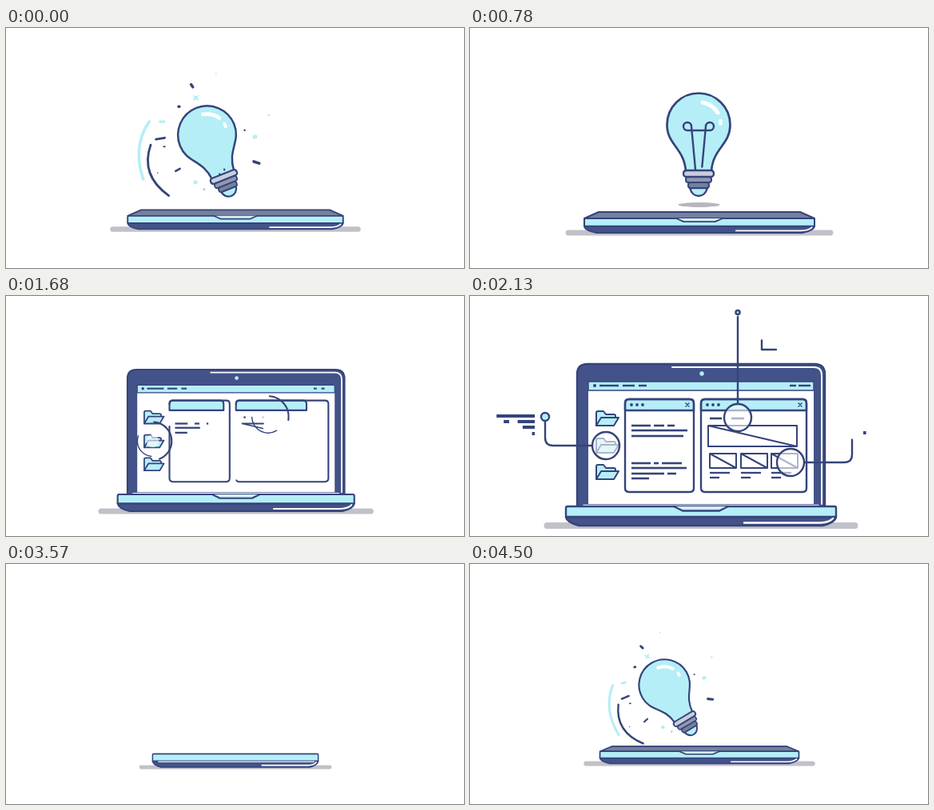
An HTML page with a canvas that plays this animation: 573x300 px, repeating every 4530 ms.

```html
<!DOCTYPE html>
<html lang="en">
<head>
<meta charset="utf-8">
<title>Idea to product</title>
<style>
html, body { margin: 0; width: 100%; height: 100%; overflow: hidden; background: #fff }
canvas { display: block }
</style>
</head>
<body>
<canvas id="stage" width="573" height="300"></canvas>
<script>
const ctx = document.getElementById('stage').getContext('2d');
const LOOP = 4530, LEAD = 230;
const INK = '#35447a', NAVY = '#435389', LIGHT = '#b5eef7', GREY = '#75809d', SHADE = '#c1c1c9', WHITE = '#fff';
let T = 0;

const smooth = u => (u = Math.min(1, Math.max(0, u)), u * u * (3 - 2 * u));
const ramp = (start, length) => smooth((T - start) / length);
const show = (start, length, gone, out = 130) => ramp(start, length) * (1 - ramp(gone, out));

// Eased value through time/value pairs
function key(...k) {
  for (let i = 2; i < k.length; i += 2)
    if (T < k[i]) return k[i - 1] + (k[i + 1] - k[i - 1]) * smooth((T - k[i - 2]) / (k[i] - k[i - 2]));
  return k[k.length - 1];
}

function draw(d, fill, stroke = INK, w = 2.4, p = 1, length = 1) {
  if (p <= 0) return;
  const path = new Path2D(d);
  if (fill) { ctx.fillStyle = fill; ctx.fill(path); }
  if (!stroke) return;
  ctx.strokeStyle = stroke;
  ctx.lineWidth = w;
  ctx.setLineDash(p < 1 ? [length * p, length * 2] : []);
  ctx.stroke(path);
  ctx.setLineDash([]);
}

const box = (x, y, w, h, r) =>
  `M${x} ${y + r}q0 ${-r} ${r} ${-r}h${w - 2 * r}q${r} 0 ${r} ${r}v${h - 2 * r}q0 ${r} ${-r} ${r}h${2 * r - w}q${-r} 0 ${-r} ${-r}z`;

function disc(x, y, r, fill, stroke, w = 2.4) {
  if (r <= 0) return;
  ctx.beginPath();
  ctx.arc(x, y, r, 0, 7);
  if (fill) { ctx.fillStyle = fill; ctx.fill(); }
  if (stroke) { ctx.strokeStyle = stroke; ctx.lineWidth = w; ctx.stroke(); }
}

function group(fn) { ctx.save(); fn(); ctx.restore(); }

// Rows are [y, from, to, from, to, ...]; every bar grows on its own
function bars(rows, start, gone, w = 2.6, fromRight = false) {
  ctx.fillStyle = INK;
  rows.forEach(([y, ...x], i) => {
    for (let j = 0; j < x.length; j += 2) {
      const width = (x[j + 1] - x[j]) * show(start + i * 25 + j * 12, 150, gone);
      ctx.fillRect(fromRight ? x[j + 1] - width : x[j], y - w / 2, width, w);
    }
  });
}

// x, y, length, angle, width, colour
const SPARKS = [
  [-51, -136, 4, 55, 3.4, INK], [-67, -110, 1, 0, 3.4, INK], [-88, -91, 5, 0, 3.4, LIGHT],
  [-90, -70, 11, -10, 2.8, INK], [-85, -60, 1, 0, 2.2, INK], [-68, -31, 6, -30, 2.6, INK],
  [-93, -27, 0, 0, 1.5, INK], [-46, -16, 1, 0, 4.5, LIGHT], [-35, -7, 0, 0, 2.8, SHADE],
  [28, -73, 1, 0, 5, LIGHT], [15, -81, 0, 0, 2.4, INK], [30, -41, 7, 18, 3.6, INK],
  [45, -100, 0, 0, 3, LIGHT], [-21, -151, 0, 0, 1.5, SHADE]
];

function sparks() {
  const size = key(-110, 0, -50, 1, 120, 1, 450, 0);
  if (T < -95 || size <= 0) return;
  group(() => {
    ctx.translate(283, 209);
    ctx.rotate(25 * (1 - Math.exp(-T / 72)) * Math.PI / 180);
    const k = 1.25 - .25 * Math.exp(-T / 66);
    ctx.scale(k, k);
    const arc = 1 - ramp(0, 260);
    draw('M-111-19Q-125-60-104-91', null, LIGHT, 3.6, arc, 78);
    draw('M-79 1Q-115-24-102-62', null, INK, 2.8, arc, 76);
    for (const [x, y, length, angle, w, colour] of SPARKS) group(() => {
      ctx.translate(x, y);
      ctx.rotate(angle * Math.PI / 180);
      ctx.scale(size, size);
      draw(`M${-length / 2} 0h${length + .01}`, null, colour, w);
    });
    group(() => {
      ctx.translate(-46, -121);
      ctx.scale(size, size);
      draw('M-4-4L0-2 4-4 2 0 4 4 0 2-4 4-2 0z', LIGHT, null);
    });
  });
}

function bulb() {
  if (T < -85 || T > 1050) return;
  const fall = 1 - .75 * ramp(900, 150);
  const size = Math.max(.1, 1 - .08 * Math.exp(-T / 33)) * fall;
  group(() => {
    ctx.translate(key(-30, 280, 0, 282, 250, 286), key(-85, 236, -30, 213, 0, 210, 250, 209, 780, 210, 890, 207, 1050, 244));
    ctx.rotate(-22 * Math.exp(-T / 87) * Math.PI / 180);
    ctx.scale(size, size);
    draw('M-16-31C-18-60-39.5-64-39.5-89A39.5 39.5 0 0 1 39.5-89C39.5-64 18-60 16-31z', LIGHT, INK, 2.7);
    const p = ramp(-20, 380) / 2;
    if (p > 0) {
      ctx.strokeStyle = INK;
      ctx.lineWidth = 2.4;
      ctx.setLineDash([179 * p, 179 * (1 - 2 * p), 179 * p, 400]);
      ctx.stroke(new Path2D('M-4-33L-9-87A5 5 0 1 0-14-82H14A5 5 0 1 0 9-87L4-33'));
      ctx.setLineDash([]);
    }
    draw('M5-117Q18-114 24-104', null, WHITE, 5);
    draw('M27.5-94v3.5', null, WHITE, 4.6);
    draw('M-11-10Q-8 0 0 0T11-10z', LIGHT);
    draw(box(-13, -17, 26, 7, 3), GREY, INK, 2);
    draw(box(-16, -24, 32, 7, 3), '#8f98b1', INK, 2);
    draw(box(-19, -32, 38, 8, 4), '#c9cede', INK, 2.3);
  });
}

function folder(y, p) {
  if (p <= 0) return;
  group(() => {
    ctx.translate(171, y + 9);
    ctx.scale(p, p);
    draw('M-13 9V-7q0-2 2-2h7l3 4H9q2 0 2 2v3', LIGHT, INK, 2);
    draw('M-13 9L-7-1H15L9 9z', LIGHT, INK, 2);
  });
}

function browser(x, width, start) {
  const p = show(start, 250, 2960), y = 129;
  if (p <= 0) return;
  draw(`M${x} ${y + 14}v-9q0-5 5-5h${width * p - 10}q5 0 5 5v9z`, LIGHT);
  draw(box(x, y, width, 116, 5), null, INK, 2.4, p, 2 * width + 232);
  const dot = show(start + 200, 150, 2940);
  for (const dx of [8, 15, 22]) disc(x + dx, 136, 1.9 * dot, INK);
  if (dot > .5) draw(`M${x + width - 10} 134l4 4m0-4l-4 4`, null, INK, 1.5);
}

function screen() {
  draw('M148 107H430V260H148z', WHITE, null);
  draw('M148 107H430V118H148z', LIGHT, INK, 1.4);
  draw('M142 261.5H436', null, WHITE, 1.5);
  disc(156, 112, 2 * show(1420, 120, 3000), INK);
  bars([[112, 162, 186, 191, 206, 211, 221, 400, 408, 411, 426]], 1530, 2980, 2.4);
  [144, 178, 211].forEach((y, i) => folder(y, show(1380 + i * 50, 150, 2970)));
  browser(194, 86, 1480);
  browser(289, 132, 1510);
  bars([[162, 202, 226, 230, 243, 247, 256], [168, 202, 272], [175, 202, 267]], 1580, 2920);
  bars([[209, 202, 226, 230, 236, 240, 265], [215, 202, 271], [222, 202, 243, 247, 258], [228, 202, 224]], 1680, 2920);
  bars([[153, 300, 315, 327, 343]], 1640, 2920);
  const banner = show(1640, 240, 2920);
  draw('M298 162H409V188H298zL409 188', null, INK, 2, banner, 388);
  [300, 339, 377].forEach((x, i) => {
    draw(`M${x} 197h33v18h-33zl33 18`, null, INK, 2, show(1700 + i * 90, 220, 2920), 140);
    bars([[221, x, x + 25], [227, x, x + 12]], 1760 + i * 70, 2920, 2.3);
  });
}

function lid(open) {
  if (open <= 0) return;
  group(() => {
    ctx.translate(0, 263);
    ctx.scale(1, open);
    ctx.translate(0, -263);
    draw('M134 264V98Q134 85 147 85H431Q444 85 444 98V264z', NAVY);
    draw('M253 89H430Q440 89 440 99V260', null, WHITE, 2);
    disc(290, 97, 2.7, LIGHT);
    screen();
  });
}

function base(h, face) {
  if (face > 0) {
    const y = 287 - 24 * h;
    draw(`M120 ${y}L141 ${y - face}H437L458 ${y}z`, GREY);
  }
  group(() => {
    ctx.translate(0, 287);
    ctx.scale(1, h);
    ctx.translate(0, -287);
    draw('M120 276H458Q457 283 441 287H137Q121 283 120 276z', NAVY);
    draw('M120 276V265Q120 263 122 263H456Q458 263 458 265V276z', LIGHT);
    if (T > 3240 || T < -120) draw('M132 277H450', null, WHITE, 1.6);
    else draw('M255 263L266 268.5H312L323 263', '#d5edf3');
    draw('M343 283.5H438Q450 283 454 278', null, WHITE, 2.4);
  });
}

function lens(x, y, start) {
  const p = show(start, 210, 2900);
  if (p <= 0) return;
  const r = 17 * (1.9 - .9 * p), turn = 2 * Math.PI * Math.min(1, p * 1.3);
  disc(x, y, r * p, 'rgba(255,255,255,.6)');
  ctx.strokeStyle = INK;
  ctx.lineWidth = 2.4;
  ctx.beginPath();
  ctx.arc(x, y, r, -1.5, -1.5 + turn);
  ctx.stroke();
  if (p < 1) {
    ctx.lineWidth = 1.6;
    ctx.beginPath();
    ctx.arc(x, y, r * .8, p * 5, p * 5 + 2 * (1 - p) + .5);
    ctx.stroke();
  }
}

function callout(x, y, path, length, endX, endY, start, lineStart, ringStart) {
  lens(x, y, start);
  draw(path, null, INK, 2.4, show(lineStart, 170, 2840), length);
  disc(endX, endY, 5 * show(ringStart, 120, 2800), LIGHT, INK);
}

function chart() {
  const p = show(2080, 170, 2800);
  if (p <= 0) return;
  const points = [[382, 38], [405, 46], [443, 23]];
  points.forEach(([x, y], i) => {
    const q = show(2300 + i * 70, 200, 2800);
    ctx.fillStyle = LIGHT;
    ctx.fillRect(x - 1.5, 66 - (66 - y) * q, 3, (66 - y) * q);
  });
  draw('M365 46L382 38 405 46 443 23', null, INK, 2, show(2220, 280, 2800), 88);
  points.forEach(([x, y], i) => disc(x, y, 2.6 * show(2260 + i * 80, 100, 2800), INK));
  draw(`M365 ${67 - 54 * p}V67H${365 + 83 * p}`);
  if (p > .95) {
    draw('M362 16L365 12 368 16z', INK, INK, 1);
    draw('M445 64L449 67 445 70z', INK, INK, 1);
  }
}

function callouts() {
  if (T < 1550 || T > 3100) return;
  callout(170, 187, 'M153 187H104Q94 187 94 177V157', 86, 94, 151, 1600, 1840, 1970);
  callout(335, 152, 'M335 135V26', 109, 335, 20.5, 1620, 1860, 2070);
  callout(401, 208, 'M418 208H468Q478 208 478 198V178', 86, 478, 172, 1840, 1975, 2140);
  bars([[150, 31, 81], [157, 54, 81, 37, 49], [164, 54, 81], [172, 70, 81]], 2000, 2790, 4, true);
  bars([[171, 492, 560], [179, 492, 520, 524, 536, 540, 552], [187, 492, 531], [194, 492, 515, 518, 530]], 2110, 2790, 4);
  chart();
}

function laptop() {
  const size = T < 800
    ? Math.max(.64, .852 - .056 * Math.exp(-T / 40))
    : key(960, .852, 1680, .876, 2100, 1, 2870, 1, 3240, .605, 4300, .64);
  const open = show(1080, 320, 2980, 230);
  ctx.translate(key(1400, 287, 2100, 289, 2870, 289, 3240, 287),
    key(-230, 254, -30, 249.5, 0, 251.5, 300, 256, 960, 256, 1080, 265, 1680, 269, 2100, 287, 2870, 287, 3240, 254));
  ctx.scale(size, size);
  ctx.translate(-289, -287);
  draw('M96.500 287H481.500', null, SHADE, 8);
  lid(open);
  base(key(-230, 1.1, -60, .86, 0, .87, 1000, .88, 1200, 1, 3000, 1, 3240, 1.13),
    T > 1180 ? 0 : key(-230, 0, -60, 8, 0, 9.4, 1050, 9.4, 1180, 0));
  callouts();
}

function frame(now) {
  T = (now + LEAD) % LOOP - LEAD;
  ctx.fillStyle = WHITE;
  ctx.fillRect(0, 0, 573, 300);
  ctx.lineCap = ctx.lineJoin = 'round';
  const hover = key(-20, 0, 300, 1, 850, 1, 1050, 0);
  if (T < 1050 && hover > 0) {
    ctx.fillStyle = '#b6b6bd';
    ctx.beginPath();
    ctx.ellipse(286.5, 221, 26 * hover, 3 * hover, 0, 0, 7);
    ctx.fill();
  }
  sparks();
  bulb();
  group(laptop);
}

const begin = performance.now();
function tick() {
  frame(performance.now() - begin);
  requestAnimationFrame(tick);
}
tick();
</script>
</body>
</html>
```
